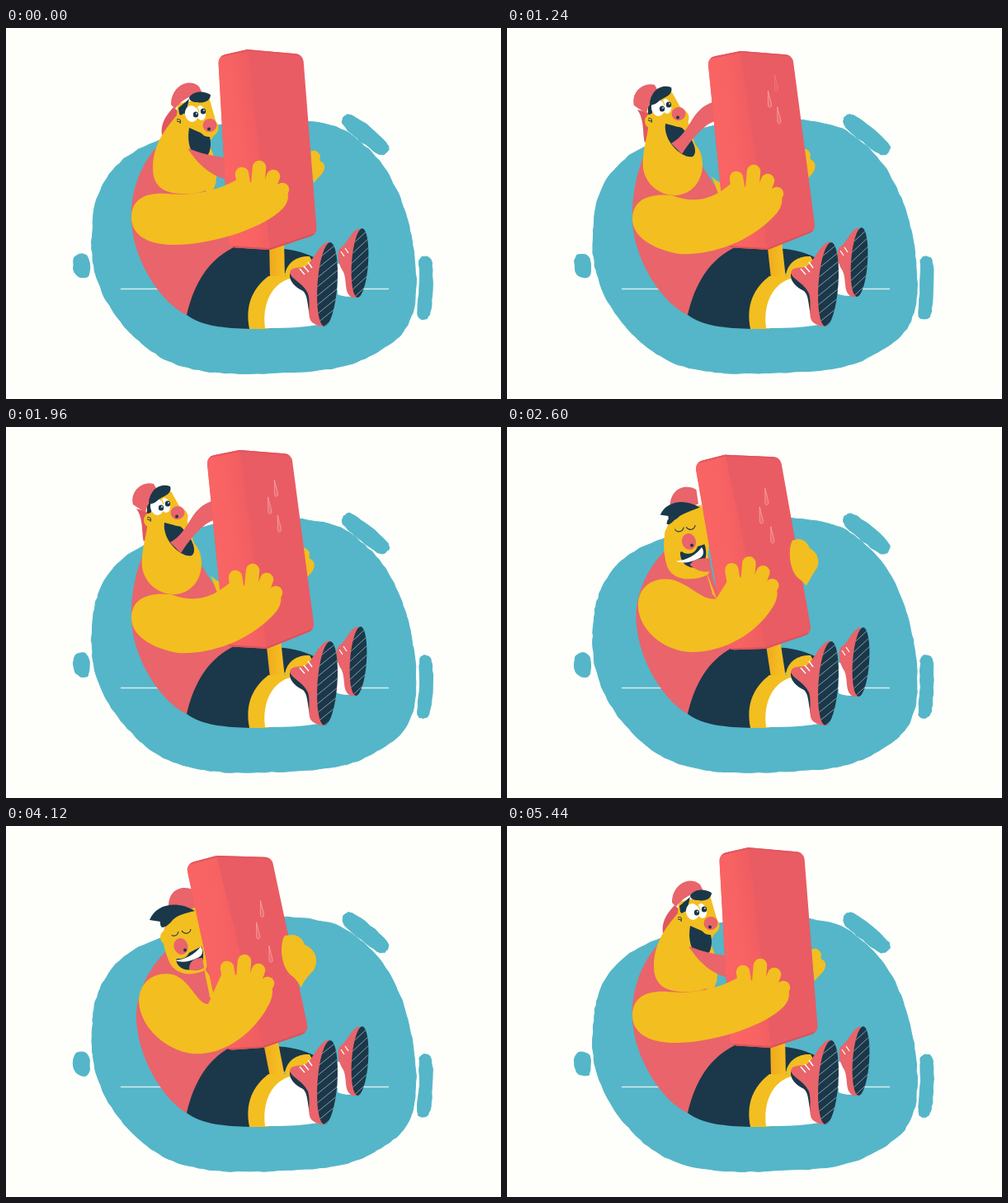
An HTML page with a canvas that plays this animation: 600 by 450 pixels, repeating every 5.48 s.

```html
<!DOCTYPE html>
<html>
<head>
<meta charset="utf-8">
<style>
html, body { margin: 0; width: 100%; height: 100%; overflow: hidden; background: #fefffb; }
canvas { display: block; }
</style>
</head>
<body>
<canvas id="stage" width="600" height="450"></canvas>
<script>
const ctx = document.getElementById('stage').getContext('2d');
const LOOP = 5480, LICK = 720;
const BLUE = '#54b6c8', NAVY = '#1a384a', SKIN = '#f3be20', RED = '#e9646b', FRONT = '#e95c64', WHITE = '#fff';

// Every pose has the same path structure, so their numbers can be mixed.
// spots: near eye, far eye, nose, snout, ear, hand shift, far foot shift
// pop: left top, ridge top, right top, right bottom, ridge bottom, left bottom
const low = {
  shirt: 'M182,145 C160,170 150,205 152,235 C155,285 190,335 219,348 L262,310 L300,262 L255,205 L246,176 L235,150Z',
  skin: 'M207,106 C195,120 178,140 178,170 C178,195 195,201 215,201 C238,202 252,195 255,182 C257,165 250,150 246,140 L257,122 L246,84 L208,92Z',
  mouth: 'M222,121 L247,132 C250,145 246,155 240,160 C228,160 218,145 222,121Z',
  tongue: 'M221,146 C235,152 250,155 270,158 L270,184 C255,182 235,170 221,147Z',
  cap: 'M200,93 C200,70 222,60 234,71 L238,79 C225,80 212,88 205,98Z',
  visor: 'M222,84 C228,76 240,76 248,81 C248,88 240,92 232,90 C226,90 222,88 222,84Z',
  hair: 'M209,97 L222,86 L218,103 C213,104 212,108 210,104Z',
  flap: 'M203,96 C192,108 187,118 189,130 C197,128 205,122 212,104Z',
  arm: 'M152,230 C152,207 170,199 195,201 C225,204 255,198 280,184 L300,188 L334,190 C347,200 343,214 330,224 C305,245 245,264 200,263 C170,262 152,250 152,230Z',
  farArm: 'M244,180 C248,182 252,182 255,186 L250,200 L242,198Z',
  farHand: 'M369,150 C374,147 379,150 381,155 C380,160 381,162 382,162 C389,165 387,175 378,182 C376,184 374,187 373,188 C371,180 370,160 369,150Z',
  pop: '257,34 293,26 360,32 377,250 320,269 270,266',
  spots: '225,104 236,103 247,118 246,121 210,114 0,0 0,0'
};
const mid = {
  shirt: 'M176,148 C158,172 150,205 152,235 C155,285 190,335 219,348 L262,310 L300,262 L262,205 L247,182 L235,150Z',
  skin: 'M194,100 C187,125 171,150 174,175 C177,195 195,204 212,204 C235,203 244,190 245,170 C246,155 244,148 240,143 L244,116 L231,78 L196,90Z',
  mouth: 'M212,118 L236,128 C242,140 243,160 234,164 C222,166 209,145 212,118Z',
  tongue: 'M214,132 C240,140 244,118 258,110 L264,140 C250,152 230,155 215,147Z',
  cap: 'M186,90 C184,68 205,59 218,70 L222,77 C210,78 200,86 190,98Z',
  visor: 'M203,86 C206,74 222,68 231,75 C231,85 222,87 214,89 C208,91 204,90 203,86Z',
  hair: 'M196,92 L210,82 L204,98 C200,99 199,103 197,99Z',
  flap: 'M190,96 C184,108 180,118 181,130 C188,128 195,115 196,104Z',
  arm: 'M152,230 C152,207 170,200 195,203 C222,210 250,204 276,187 L296,191 L330,193 C343,203 337,217 326,227 C295,256 245,270 205,269 C172,265 152,250 152,230Z',
  farArm: 'M245,178 C252,182 258,188 268,190 L268,205 L246,198Z',
  farHand: 'M363,148 C368,145 373,148 375,153 C374,158 375,160 376,160 C384,163 382,173 374,180 C371,183 370,186 369,188 C366,178 364,158 363,148Z',
  pop: '249,35 290,27 354,33 376,248 318,269 269,266',
  spots: '211,99 222,98 235,111 233,116 198,107 -4,3 -1,0'
};
const high = {
  shirt: 'M167,152 C157,175 151,205 152,235 C155,285 190,335 219,348 L262,310 L300,262 L262,205 L247,184 L232,160Z',
  skin: 'M171,105 C175,122 163,145 165,170 C168,190 185,203 204,203 C225,202 237,185 237,165 C237,154 233,146 228,141 L219,112 L200,78 L170,90Z',
  mouth: 'M192,116 L212,121 C224,132 233,150 225,156 C213,159 189,138 192,116Z',
  tongue: 'M199,140 C224,126 222,99 249,90 L253,113 C240,115 222,137 212,153Z',
  cap: 'M154,94 C150,78 165,65 179,69 L183,76 C176,84 171,94 169,104Z',
  visor: 'M173,92 C174,78 185,67 199,72 C202,81 191,84 185,88 C181,92 175,95 173,92Z',
  hair: 'M171,96 L177,86 L176,103 C173,106 172,108 171,104Z',
  flap: 'M158,99 C167,112 164,128 167,139 C172,135 174,125 175,104Z',
  arm: 'M152,232 C152,208 172,200 200,203 C224,212 246,211 271,189 L292,193 L326,195 C339,205 333,220 322,230 C290,262 245,276 208,274 C175,268 152,252 152,232Z',
  farArm: 'M248,180 C254,186 258,188 266,190 L268,210 L258,206Z',
  farHand: 'M357,148 C362,145 366,148 368,153 C367,158 368,160 369,160 C376,163 375,173 367,180 C364,183 363,186 362,188 C360,178 358,158 357,148Z',
  pop: '243,36 283,28 346,33 374,246 316,269 266,266',
  spots: '183,97 193,95 208,104 209,109 174,113 -8,5 -2,-1'
};
const hug = {
  shirt: 'M196,150 C172,172 153,210 159,245 C164,290 195,335 219,348 L262,310 L300,262 L262,215 L252,190 L246,150Z',
  skin: 'M195,115 C186,135 192,150 198,165 C203,176 215,181 228,179 C236,177 242,176 243,172 C244,168 243,165 243,160 L243,130 L232,98 L202,104Z',
  mouth: 'M206,162 L237,146 C242,160 238,172 226,174 C214,176 207,170 206,162Z',
  tongue: 'M222,174 C222,164 228,160 238,160 L240,172 C234,176 228,176 222,174Z',
  cap: 'M197,99 C196,76 215,71 228,78 L230,98 C225,102 212,102 203,102Z',
  visor: 'M174,114 C182,94 208,90 229,103 C216,106 208,108 202,114 C196,122 186,128 187,116Z',
  hair: 'M190,118 L206,106 L200,114 C196,120 192,124 188,122Z',
  flap: 'M200,95 C201,98 204,98 205,100 C210,100 212,99 212,97Z',
  arm: 'M161,212 C162,185 185,175 205,181 C225,190 232,216 245,216 L262,178 L317,187 C328,198 322,212 314,225 C290,262 255,279 225,276 C195,272 162,245 161,212Z',
  farArm: 'M240,172 C242,185 245,195 247,208 L256,212 L247,182Z',
  farHand: 'M341,133 C352,129 360,137 362,144 C377,150 379,165 373,175 C364,184 360,190 358,196 C354,190 352,186 348,183 C328,170 333,128 341,133Z',
  pop: '218,46 255,36 322,38 367,250 312,269 266,272',
  spots: '204,129 219,126 212,146 211,150 194,135 -18,-5 0,0'
};

const smooth = k => k * k * (3 - 2 * k);
const speedUp = k => k * k;
const slowDown = k => 1 - (1 - k) * (1 - k);
const clamp = v => Math.max(0, Math.min(1, v));

// Each key: time, pose, easing towards the next key
const keys = [];
for (let n = 0; n < 3; n++) {
  const t = n * LICK;
  keys.push([t, low, speedUp], [t + 140, mid, slowDown], [t + 340, high, smooth],
    [t + 520, high, speedUp], [t + 600, mid, slowDown]);
}
keys.push([3 * LICK, low, smooth], [2810, hug, smooth], [4760, hug, smooth], [5440, low, smooth], [LOOP, low, smooth]);

const NUM = /-?\d+(\.\d+)?/g;
function mix(a, b, k) {
  const to = b.match(NUM);
  let i = 0;
  return a.replace(NUM, n => (+n + (to[i++] - n) * k).toFixed(2));
}
const points = s => s.split(' ').map(p => p.split(',').map(Number));
const between = (p, q, k) => [p[0] + (q[0] - p[0]) * k, p[1] + (q[1] - p[1]) * k];

function poseAt(t) {
  let i = 0;
  while (t >= keys[i + 1][0]) i++;
  const [t0, a, ease] = keys[i], [t1, b] = keys[i + 1];
  const k = ease((t - t0) / (t1 - t0)), pose = {};
  for (const part in a) pose[part] = a === b ? a[part] : mix(a[part], b[part], k);
  pose.hug = (a === hug ? 1 - k : 0) + (b === hug ? k : 0);
  return pose;
}

function fill(d, color) {
  ctx.fillStyle = color;
  ctx.fill(new Path2D(d));
}
function stroke(d, color, width) {
  ctx.strokeStyle = color;
  ctx.lineWidth = width;
  ctx.stroke(new Path2D(d));
}
function oval(x, y, rx, ry, color, turn = 0) {
  ctx.beginPath();
  ctx.ellipse(x, y, rx, ry, turn, 0, 7);
  ctx.fillStyle = color;
  ctx.fill();
}
function random(seed) {
  return () => {
    seed = (seed * 16807) % 2147483647;
    return seed / 2147483647;
  };
}

// Smooth closed outline with a restless edge
function rough(text, steps, rnd) {
  const p = points(text), n = p.length;
  ctx.beginPath();
  for (let i = 0; i < n; i++) {
    const [a, b, c, d] = [0, 1, 2, 3].map(j => p[(i + j) % n]);
    for (let s = 0; s < steps; s++) {
      const u = s / steps;
      const at = j => b[j] + u / 2 * (c[j] - a[j] + u * (2 * a[j] - 5 * b[j] + 4 * c[j] - d[j] + u * (3 * (b[j] - c[j]) + d[j] - a[j])));
      ctx.lineTo(at(0) + (rnd() - .5) * 1.2, at(1) + (rnd() - .5) * 1.2);
    }
  }
  ctx.closePath();
  ctx.fillStyle = ctx.strokeStyle = BLUE;
  ctx.lineWidth = 1;
  ctx.lineJoin = 'round';
  ctx.fill();
  ctx.stroke();
}

function backdrop(t) {
  const rnd = random(977 + 131 * Math.floor(t / 120));
  rough('105,240 109,212 122,182 148,155 190,135 250,119 300,112 350,111 400,120 430,139 456,166 475,200 487,235 494,270 497,310 493,345 478,373 450,393 420,407 380,415 330,418 280,419 240,416 202,406 171,388 143,361 122,331 109,299 104,268', 6, rnd);
  rough('408,111 412,106 420,106 442,121 461,139 464,147 459,153 450,152 431,138 411,121', 4, rnd);
  rough('501,290 502,280 508,277 515,281 517,300 516,330 513,348 507,353 500,351 499,340 501,315', 4, rnd);
  rough('83,278 92,274 100,279 101,296 97,303 87,301 82,292', 3, rnd);
  stroke('M139,316.5H464', 'rgba(255,255,255,.75)', 1.3);
}

function sole(x, y, rx, ry) {
  ctx.save();
  oval(x, y, rx, ry, NAVY, .07);
  ctx.clip();
  for (let s = -ry; s < ry + 12; s += 11)
    stroke(`M${x - rx - 4},${y + s + 13}L${x + rx + 4},${y + s - 13}`, 'rgba(255,255,255,.55)', .9);
  ctx.restore();
}

function farLeg([dx, dy]) {
  ctx.save();
  ctx.translate(dx, dy);
  fill('M400,285 L402,323 C408,326 416,326 424,326 L416,290Z', WHITE);
  fill('M428,243 C418,246 414,262 404,268 C401,276 403,287 409,296 C414,308 409,322 420,327 L428,327 L434,290Z', RED);
  stroke('M406,271l4,6 M411,267l4,6', WHITE, 1.3);
  sole(429, 285, 10, 42);
  ctx.restore();
}

function nearLeg() {
  fill('M318,301 C300,315 289,335 295,365 L318,365 L350,320 L352,301Z', SKIN);
  fill('M338,300 C340,283 355,276 368,277 L375,290 L350,305Z', SKIN);
  fill('M314,364 C310,335 322,308 348,303 L375,330 L378,360 C355,364 335,364 314,364Z', WHITE);
  fill('M344,298 C343,307 350,314 360,319 C368,326 364,345 372,356 L384,340 L365,298Z', NAVY);
  fill('M392,259 C378,262 374,282 362,290 C354,291 345,290 344,297 C346,305 360,309 366,322 C370,336 364,350 371,357 C376,361 382,362 387,362 L398,310Z', RED);
  stroke('M356,292l6,7 M361,289l6,7 M366,284l5,7', WHITE, 1.4);
  sole(389.5, 311, 12, 51);
}

function head(p, t) {
  const [eye1, eye2, nose, snout, ear] = points(p.spots);
  const asleep = p.hug > .5;
  ctx.save();
  ctx.translate(0, -1.4 * p.hug * (1 - Math.cos((t - 520) / LICK * 2 * Math.PI)));
  fill(p.flap, '#e0575f');
  fill(p.skin, SKIN);
  fill(p.mouth, NAVY);
  fill(p.tongue, RED);
  oval(...snout, 11.5, 11, SKIN);
  fill(p.hair, NAVY);
  if (asleep) {
    fill('M205,163 C218,162 230,155 236,146 C240,152 238,158 232,160 C222,165 212,166 205,163Z', WHITE);
    for (const [x, y] of [eye1, eye2]) stroke(`M${x - 6},${y + 1}C${x - 3},${y + 6} ${x + 4},${y + 5} ${x + 5},${y - 1}`, NAVY, 1.1);
  } else {
    oval(...eye1, 8, 10, WHITE, -.2);
    oval(...eye2, 6, 9, WHITE, -.2);
    stroke(`M${eye2[0] - 5},${eye2[1] - 9}l3,8`, SKIN, 1.2);
    for (const [x, y] of [[eye1[0] + 5, eye1[1] + 1], [eye2[0] + 3, eye2[1] - 2]]) {
      oval(x, y, 3.2, 3.6, NAVY);
      oval(x + 1, y - 1.2, .9, .9, WHITE);
    }
  }
  oval(...nose, 8.5, asleep ? 10 : 8, RED, -.3);
  oval(nose[0] + p.hug * 5 - (1 - p.hug), nose[1] + 4.5, 2, 2, NAVY);
  oval(...ear, 7, 8.5, SKIN);
  if (!asleep) stroke(`M${ear[0] - 3},${ear[1] - 3}q6,-2 4,5 m-4,-3 l4,1`, NAVY, 1);
  fill(p.cap, RED);
  fill(p.visor, NAVY);
  ctx.restore();
}

function roundPoly(p, r) {
  const start = between(p[p.length - 1], p[0], .5);
  ctx.beginPath();
  ctx.moveTo(...start);
  p.forEach((q, i) => ctx.arcTo(...q, ...(p[i + 1] || start), r));
  ctx.closePath();
}

function popsicle(p, t) {
  const corners = points(p.pop), [lt, ridge, rt, rb, foot, lb] = corners;
  ctx.save();
  roundPoly(corners, 10);
  ctx.fillStyle = FRONT;
  ctx.fill();
  ctx.clip();
  const shade = ctx.createLinearGradient(lt[0], 150, foot[0], 140);
  shade.addColorStop(0, '#fb6564');
  shade.addColorStop(.5, '#f76263');
  shade.addColorStop(1, '#ec5b60');
  fill(`M${lt}L${ridge}L${foot}L${lb}Z`, shade);
  stroke(`M${lt}L${ridge}L${rt}`, '#e2575e', 4);
  stroke(`M${lb}L${foot}L${rb}`, '#db5259', 4);
  ctx.restore();

  // across, start depth, speed, time of appearing
  for (const [u, v0, speed, born] of [[.43, .18, .055, 250], [.57, .25, .07, 250], [.6, .11, .044, 1000]]) {
    const v = v0 + speed * t / 1000;
    const [x, y] = between(between(ridge, foot, v), between(rt, rb, v), u);
    ctx.save();
    ctx.globalAlpha = .75 * clamp((t - born) / 700) * clamp((5150 - t) / 400);
    ctx.translate(x, y);
    ctx.rotate(-.12);
    const drop = 'M0,-11 C.6,-3 2.4,3 2,7 C1.6,10 -1.6,10 -1.9,7 C-2,3 -.6,-3 0,-11Z';
    fill(drop, '#ee7077');
    stroke(drop, '#f9b0ad', .9);
    ctx.restore();
  }
}

function stick(p) {
  const x = points(p.pop)[4][0];
  const wood = ctx.createLinearGradient(x, 0, x + 18, 0);
  wood.addColorStop(0, '#efaa1d');
  wood.addColorStop(1, '#f6bd22');
  fill(`M${x - 1},258 L320,304 L338,304 L${x + 17},258Z`, wood);
}

function nearArm(p) {
  const [hx, hy] = points(p.spots)[5];
  fill(p.arm, SKIN);
  ctx.save();
  ctx.translate(hx, hy);
  ctx.lineCap = 'round';
  stroke('M290,202L286,177 M304,204L307,169 M314,207L324,180 M322,212L335,196', SKIN, 16.5);
  ctx.restore();
}

function draw(t) {
  const p = poseAt(t);
  ctx.fillStyle = '#fefffb';
  ctx.fillRect(0, 0, 600, 450);
  backdrop(t);
  farLeg(points(p.spots)[6]);
  fill(p.shirt, RED);
  fill('M219,348 C228,310 245,280 280,264 L338,268 C355,270 372,276 384,284 L330,300 C305,315 292,335 296,365 C265,364 238,362 219,348Z', NAVY);
  stick(p);
  nearLeg();
  fill(p.farArm, SKIN);
  head(p, t);
  if (p.hug <= .5) fill(p.farHand, SKIN);
  popsicle(p, t);
  if (p.hug > .5) fill(p.farHand, SKIN);
  nearArm(p);
}

const begin = performance.now();
function tick() {
  draw((performance.now() - begin) % LOOP);
  requestAnimationFrame(tick);
}
tick();
</script>
</body>
</html>
```
